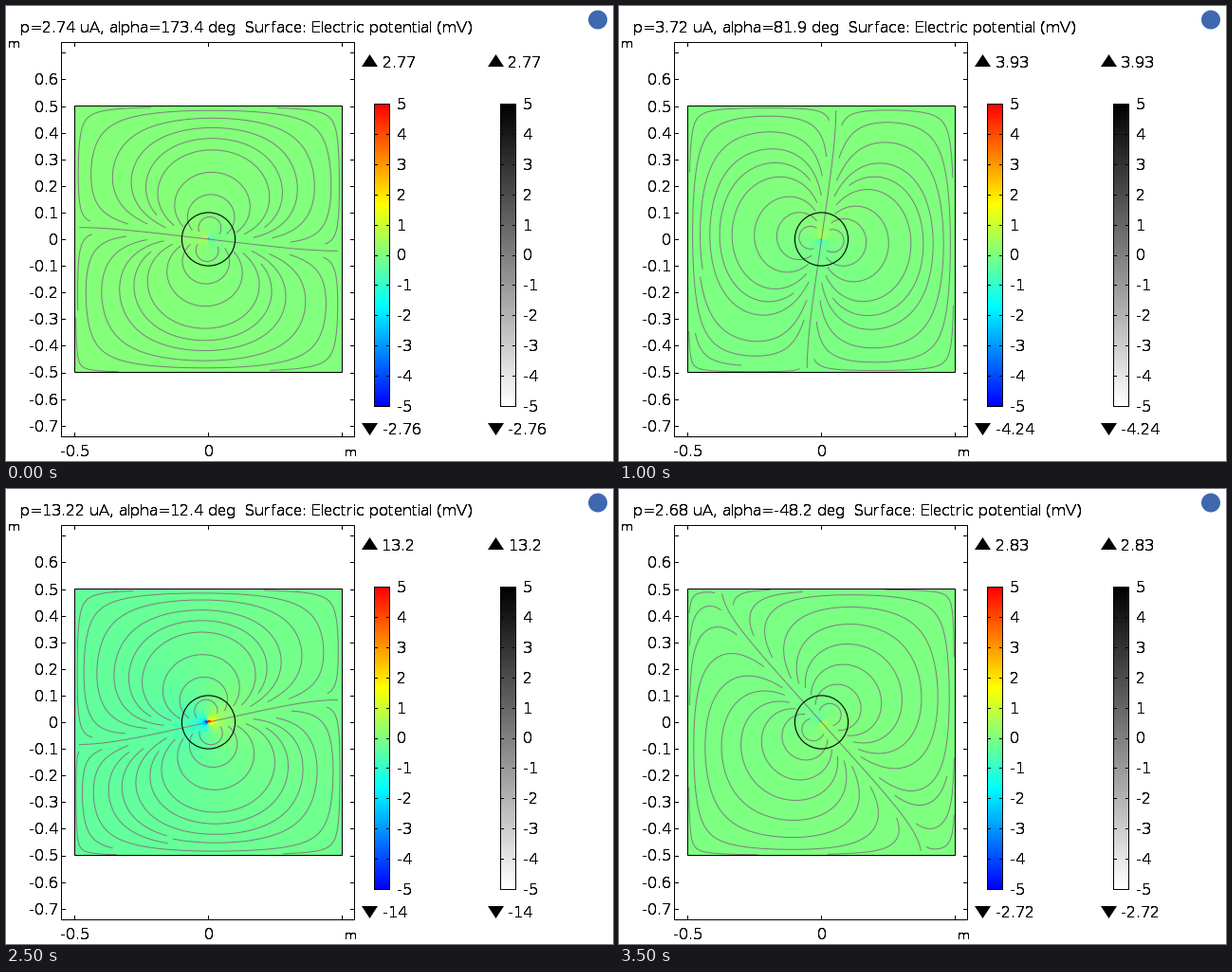
Animation, 640 px wide and 480 px high, one loop 4000 ms. Source, as a matplotlib script:

```python
import math

import numpy as np
import matplotlib.pyplot as plt
from matplotlib.animation import FuncAnimation
from matplotlib.collections import LineCollection
from matplotlib.colors import LinearSegmentedColormap
from matplotlib.patches import Circle, Polygon, Rectangle
from matplotlib.text import Text

# whole-pixel glyph advances
plt.rcParams["text.hinting"] = "default"
plt.rcParams["text.hinting_factor"] = 1

W, H, DPI = 640, 480, 80
PX = 72 / DPI
CX, CY, SCALE = 213.5, 246, 281.5      # plot centre and pixels per metre
GAIN, GROUND = 0.0026, 8               # mV per uA, reference level
STEP = 2 / SCALE
SPACING, FILL_GAP, STOP_GAP = 24.2 / SCALE, 14.5 / SCALE, 6.5 / SCALE

# dipole (uA), angle (deg), highest and lowest potential (mV)
STATES = [
    (2.74, 173.4, 2.77, -2.76),
    (2.31, 128.4, 2.36, -2.38),
    (3.72, 81.9, 3.93, -4.24),
    (20, 54, 20.7, -22.9),
    (17.35, 33.1, 17.9, -19.2),
    (13.22, 12.4, 13.2, -14),
    (3.84, -9.5, 3.83, -4.06),
    (2.68, -48.2, 2.83, -2.72),
]

RAINBOW = LinearSegmentedColormap.from_list(
    "rainbow4", ["blue", "cyan", "yellow", "red"], N=512)
IMAGES = np.arange(-3, 4)
SIGNS = (-1.0) ** IMAGES


def potential(z, d):
    """Potential of a dipole d at the centre of an insulated unit square."""
    w = 0
    for m, s in zip(IMAGES, SIGNS):
        w = w + s * np.pi * (d.real / np.tanh(np.pi * (z - m))
                             + 1j * d.imag / np.tan(np.pi * (z - 1j * m)))
    return np.real(w)


def direction(z, d):
    a = np.sum(SIGNS / np.sinh(np.pi * (z - IMAGES)) ** 2)
    b = np.sum(SIGNS / np.sin(np.pi * (z - 1j * IMAGES)) ** 2)
    f = np.conj(d.real * a + 1j * d.imag * b)
    return f / abs(f)


def gap(z, taken):
    return np.min(np.abs(taken - z)) if len(taken) else 9.0


def trace(z, d, way, taken, margin=0.4965):
    pts = [z]
    for _ in range(700):
        mid = z + way * STEP / 2 * direction(z, d)
        z = z + way * STEP * direction(mid, d)
        if max(abs(z.real), abs(z.imag)) > margin or gap(z, taken) < STOP_GAP:
            break
        pts.append(z)
        if len(pts) > 20 and abs(z - pts[0]) < STEP * 0.8:
            break
    return pts


def streamlines(d):
    """Axis first, then loops from the inside out, then fill the gaps."""
    none = np.array([])
    ahead = trace(0.01 * d, d, 1, none, 0.487)
    behind = trace(-0.01 * d, d, -1, none, 0.487)
    lines = [np.array(behind[::-1] + ahead)]
    taken = lines[0]

    def add(seed):
        nonlocal taken
        back = trace(seed, d, -1, taken)
        line = np.array(back[:0:-1] + trace(seed, d, 1, taken))
        if len(line) >= 8:
            lines.append(line)
            taken = np.concatenate([taken, line])

    across = 1j * d
    reach = 0.5 / max(abs(across.real), abs(across.imag))
    n = math.ceil(reach / SPACING)
    for k in range(1, n + 1):
        r = reach * k / n if k < n else reach - 0.018
        add(across * r)
        add(-across * r)

    grid = np.linspace(-0.475, 0.475, 24)
    for y in grid:
        for x in grid:
            if gap(x + 1j * y, taken) > FILL_GAP:
                add(x + 1j * y)
    return [np.column_stack([CX + SCALE * l.real, CY - SCALE * l.imag])
            for l in lines]


def surface(p, d):
    x = (np.arange(282) + 0.5) / 282 - 0.5
    y = 0.5 - (np.arange(281) + 0.5) / 281
    z = x + 1j * y[:, None] + 1e-6
    return GAIN * p * (potential(z, d) - GROUND * d.real)


class HeavyText(Text):
    """Text with its soft edges darkened by drawing it repeatedly."""

    def draw(self, renderer):
        for _ in range(3):
            super().draw(renderer)


fig = plt.figure(figsize=(W / DPI, H / DPI), dpi=DPI, facecolor="white")
ax = fig.add_axes([0, 0, 1, 1])
ax.axis("off")


def text(x, y, s, ha="left", size=16):
    return ax.add_artist(HeavyText(x, y, s, ha=ha, va="baseline",
                                   fontsize=size * PX, family="DejaVu Sans",
                                   color="black", zorder=5))


def line(x0, y0, x1, y1):
    ax.plot([x0, x1], [y0, y1], color="black", lw=PX, zorder=4)


def box(x0, y0, x1, y1):
    ax.add_patch(Rectangle((x0, y0), x1 - x0, y1 - y0, fill=False,
                           ec="black", lw=PX, zorder=4))


def frame_axes():
    box(58, 38, 367, 454)
    for k in range(-7, 8):
        y = CY - 28.1 * k
        line(58, y, 62, y)
        line(363, y, 367, y)
        if k < 7:
            text(55, y + 6, f"{k / 10:g}", "right")
    for x in (72, 213, 354):
        line(x, 454, x, 450)
        line(x, 38, x, 42)
    text(73, 475, "-0.5", "center")
    text(CX, 475, "0", "center")
    text(2, 44, "m", size=13)
    text(357, 475, "m", size=13)


def colour_bar(x, cmap):
    ramp = np.linspace(1, 0, 319)[:, None]
    ax.imshow(ramp, cmap=cmap, vmin=0, vmax=1, aspect="auto",
              extent=(x, x + 16, 422, 103))
    box(x, 103, x + 16, 422)
    for v in range(-5, 6):
        y = 262.5 - 31.9 * v
        line(x, y, x + 3, y)
        line(x + 13, y, x + 16, y)
        text(x + 24, y + 6, str(v))
    for tip, base in ((51, 64), (453, 440)):
        ax.add_patch(Polygon([(x - 13, base), (x + 4, base), (x - 4.5, tip)],
                             fc="black", ec="none"))
    return text(x + 8.5, 65, ""), text(x + 8.5, 452, "")


frame_axes()
bars = [colour_bar(388, RAINBOW), colour_bar(521, "gray_r")]
title = text(15, 28, "")
field = ax.imshow(np.zeros((281, 282)), cmap=RAINBOW, vmin=-5, vmax=5,
                  aspect="auto", interpolation="nearest",
                  extent=(72, 354, 386, 105))
flow = LineCollection([], colors="#7f7f7f", linewidths=PX, zorder=3)
ax.add_collection(flow)
box(72, 105, 354, 386)
ax.add_patch(Circle((CX, CY), 28.1, fill=False, ec="black", lw=1.1 * PX,
                    zorder=4))
ax.add_patch(Circle((624, 14.5), 10, fc="#3f68b0", ec="none"))
ax.set_xlim(0, W)
ax.set_ylim(H, 0)

scenes = []
for p, angle, *_ in STATES:
    d = complex(np.exp(1j * np.radians(angle)))
    scenes.append((surface(p, d), streamlines(d)))


def update(i):
    p, angle, high, low = STATES[i]
    values, lines = scenes[i]
    field.set_data(values)
    flow.set_segments(lines)
    title.set_text(f"p={p:g} uA, alpha={angle:g} deg  "
                   "Surface: Electric potential (mV)")
    for top, bottom in bars:
        top.set_text(f"{high:g}")
        bottom.set_text(f"{low:g}")
    return field, flow, title


anim = FuncAnimation(fig, update, frames=len(STATES), interval=500,
                     repeat=True, repeat_delay=0, blit=False)
plt.show()
```
